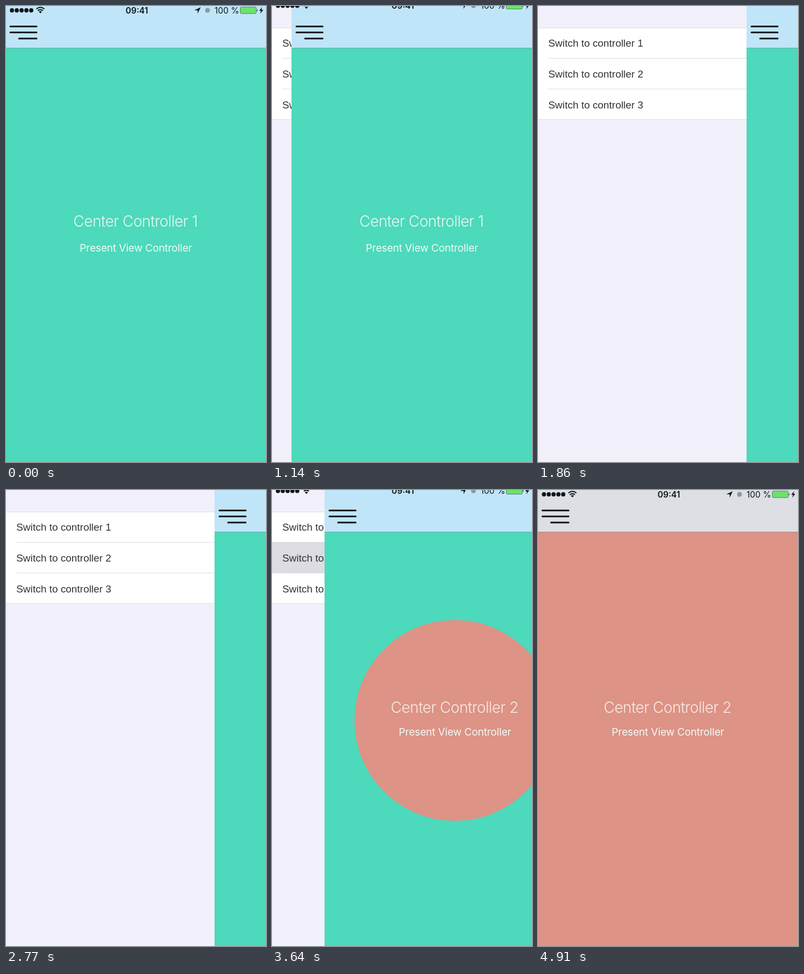
An HTML page that plays this animation: 480 by 841 pixels, repeating every 4960 ms.

```html
<!DOCTYPE html>
<html lang="en">
<head>
<meta charset="utf-8">
<title>Side menu</title>
<style>
  html, body { margin: 0; width: 100%; height: 100%; overflow: hidden; background: #f2f0fa; }
  #stage { position: relative; width: 480px; height: 841px; overflow: hidden; }
  #stage > *, .view { position: absolute; left: 0; top: 0; }
  .view { width: 480px; height: 841px; overflow: visible; }
  svg { display: block; }
  .inter { font-family: Inter, sans-serif; }
  .rows { font: 18.9px "Liberation Sans", Arial, sans-serif; fill: #323237; }
</style>
</head>
<body>
<div id="stage">
  <svg id="menu" width="480" height="841">
    <rect width="480" height="841" fill="#f2f0fa"/>
    <rect y="40" width="480" height="169" fill="#fff"/>
    <path d="M0 40.5H480M0 209.5H480" stroke="#dddce2"/>
    <path d="M19 96.5H480M19 153H480" stroke="#dddce2"/>
    <rect id="pick" y="96" width="480" height="57.5" fill="#dedce3"/>
    <g class="rows">
      <text x="19" y="75.3">Switch to controller 1</text>
      <text x="19" y="132">Switch to controller 2</text>
      <text x="19" y="188.6">Switch to controller 3</text>
    </g>
  </svg>

  <div id="center" class="view"></div>

  <svg id="status" class="inter" width="480" height="25">
    <g id="dots"></g>
    <g fill="none" stroke="#10151a" stroke-width="2">
      <path d="M56 5.6Q63.5 -0.6 71 5.6"/>
      <path d="M58.8 8.6Q63.5 4.8 68.2 8.6"/>
    </g>
    <path d="M60.6 10.8Q63.5 8.4 66.4 10.8L63.5 13.6Z" fill="#10151a"/>
    <text x="241.5" y="13.5" font-size="15.5" font-weight="600" text-anchor="middle" fill="#10151a">09:41</text>
    <path d="M347.5 8L359.5 2.2L353.8 14V8Z" fill="#10151a"/>
    <circle cx="372" cy="8" r="4.5" fill="#8e9aa3"/>
    <text id="charge" x="385" y="13.5" font-size="15.5" fill="#10151a">100 %</text>
    <rect x="432.5" y="2" width="29.5" height="12" rx="2" fill="#6be36b" stroke="#5c7a72"/>
    <path d="M463 5.5Q465.5 8 463 10.5Z" fill="#3a4a4c"/>
    <path d="M473 1.8L467.5 8.8H470.8L469.3 14.2L475 7H471.6Z" fill="#10151a"/>
  </svg>
</div>

<script>
const $ = id => document.getElementById(id);
const LOOP = 4960, STEP = 1000 / 22;
const OPEN = 385.5, BAR = 25, CLOSE = 3435, SHUT = 3735;

// The panel's fill reaches a little past its left edge.
function screen(n, bar, line, body, titleY, ink) {
  return `<svg id="view${n}" class="view inter" width="480" height="841">
    <rect x="-1" width="481" height="841" fill="${body}"/>
    <rect x="-1" width="481" height="77" fill="${bar}"/>
    <path d="M-1 77.5H480" stroke="${line}"/>
    <path d="M8 37.8H56.5M8 48.8H56.5M24 60.1H56.5" stroke="#10151a" stroke-width="3" stroke-linecap="round"/>
    <text x="239" y="${titleY}" font-size="28" font-weight="300" letter-spacing="-.65" text-anchor="middle" fill="${ink}">Center Controller ${n}</text>
    <text x="239.8" y="453" font-size="19" letter-spacing="-.18" text-anchor="middle" fill="#f0fbf8">Present View Controller</text>
  </svg>`;
}

$("center").innerHTML =
  screen(1, "#c0e5f8", "#70a9ad", "#4dd9bb", 407, "#e4f8f3") +
  screen(2, "#dddfe5", "#a08e8f", "#dd9385", 411, "#f8e9e6");
$("dots").innerHTML = [0, 1, 2, 3, 4]
  .map(i => `<circle cx="${11 + i * 8.9}" cy="8" r="3.9" fill="#10151a"/>`).join("");

const part = (t, a, b) => Math.min(1, Math.max(0, (t - a) / (b - a)));
const smooth = u => u * u * (3 - 2 * u);

// A drag: quick start, steady travel, short settle; then an eased close.
function slide(t) {
  if (t < 1000) return 0;
  if (t < 1137) return 37 * part(t, 1000, 1137) ** 2;
  if (t < 1790) return 37 + .487 * (t - 1137);
  if (t < CLOSE) return 355 + (OPEN - 355) * (1 - (1 - part(t, 1790, 1860)) ** 2);
  return OPEN * (1 - smooth(part(t, CLOSE, SHUT)));
}

function draw(t) {
  $("center").style.transform = `translateX(${Math.round(slide(t))}px)`;
  const hidden = smooth(part(t, 1000, 1350)) - smooth(part(t, CLOSE, SHUT));
  $("status").style.transform = `translateY(${-BAR * hidden}px)`;
  $("pick").style.opacity = t > 3380 ? 1 : 0;
  const r = Math.max(0, 348 + 1.2 * (t - 3772));
  $("view2").style.clipPath = r > 490 ? "none" : `circle(${r}px at 239.5px 425px)`;
}

function tick() {
  const t = performance.now() % LOOP;
  draw(Math.floor((t + 5) / STEP) * STEP % (LOOP - 1));
  requestAnimationFrame(tick);
}
tick();
</script>
</body>
</html>
```
